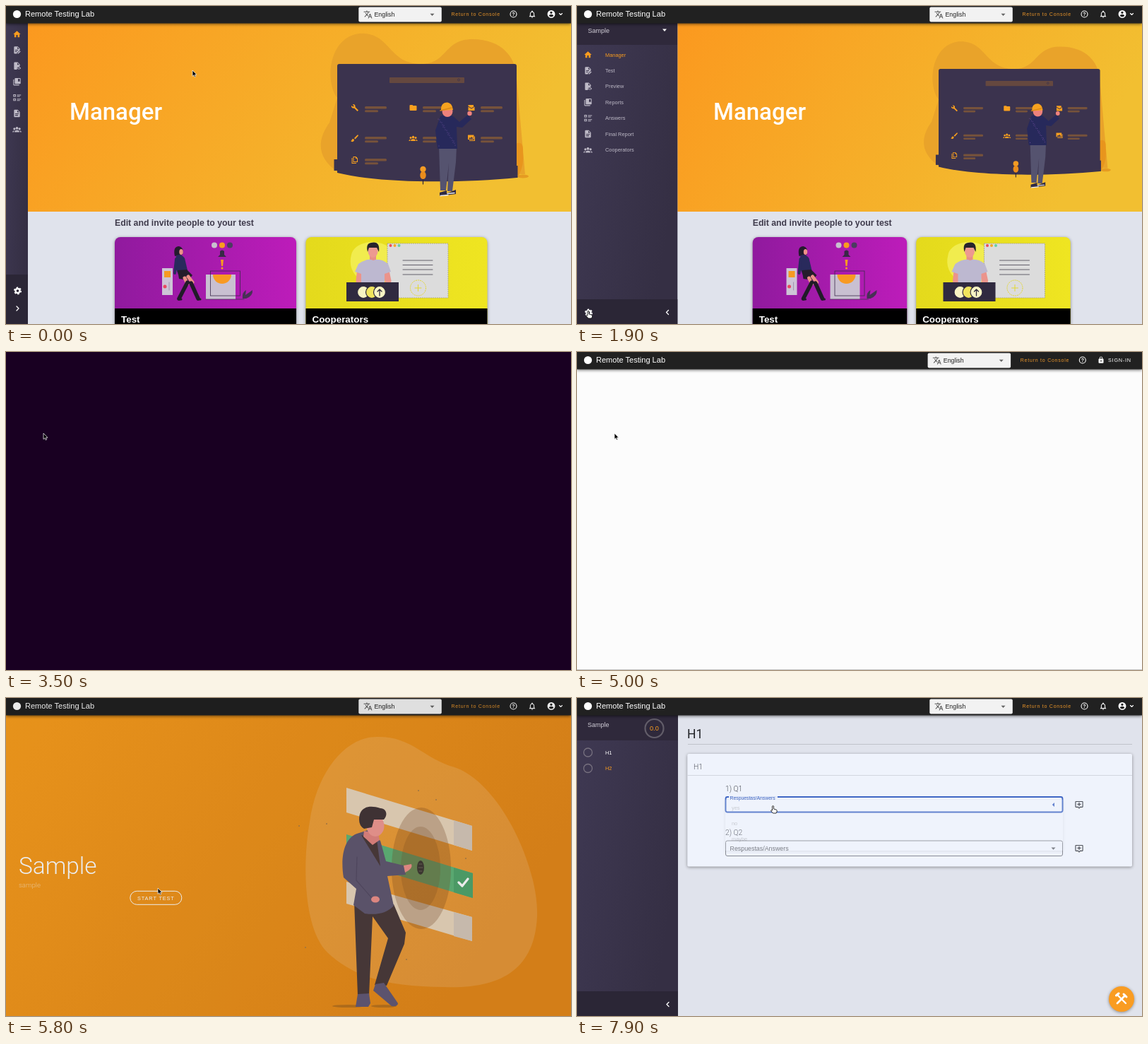
Animation of 800 by 450 pixels, one loop 8 s. Source, as an HTML page:

```html
<!DOCTYPE html>
<html lang="en">
<head>
<meta charset="utf-8">
<title>Remote Testing Lab</title>
<style>
html, body { margin: 0; width: 100%; height: 100%; overflow: hidden; background: #e0e3ec; }
svg { display: block; width: 800px; height: 450px; font-family: "Liberation Sans", Arial, sans-serif; }
.rb { font-family: Roboto, sans-serif; }
.card { filter: drop-shadow(0 1px 2px #0006); }
</style>
</head>
<body>
<svg id="stage" viewBox="0 0 800 450"></svg>
<script>
const svg = document.getElementById("stage");
const text = (x, y, size, fill, str, extra = "") =>
  `<text x="${x}" y="${y}" font-size="${size}" fill="${fill}" ${extra}>${str}</text>`;
const rect = (x, y, w, h, fill, extra = "") =>
  `<rect x="${x}" y="${y}" width="${w}" height="${h}" fill="${fill}" ${extra}/>`;
const circ = (x, y, r, fill, extra = "") => `<circle cx="${x}" cy="${y}" r="${r}" fill="${fill}" ${extra}/>`;
const oval = (x, y, rx, ry, fill, extra = "") =>
  `<ellipse cx="${x}" cy="${y}" rx="${rx}" ry="${ry}" fill="${fill}" ${extra}/>`;
const path = (d, fill, extra = "") => `<path d="${d}" fill="${fill}" ${extra}/>`;
const line = (d, color, w, extra = "") =>
  path(d, "none", `stroke="${color}" stroke-width="${w}" stroke-linecap="round" stroke-linejoin="round" ${extra}`);
const group = (id, inner, extra = "") => `<g id="${id}" ${extra}>${inner}</g>`;
// 24-unit icon centred on a point
const icon = (name, x, y, fill, size = 12) =>
  `<g transform="translate(${x - size / 2} ${y - size / 2}) scale(${size / 24})">${path(icons[name], fill, 'fill-rule="evenodd"')}</g>`;
const grad = (id, a, b, x2 = 1, y2 = 0) =>
  `<linearGradient id="${id}" x2="${x2}" y2="${y2}"><stop stop-color="${a}"/><stop offset="1" stop-color="${b}"/></linearGradient>`;

const sheet = "M6 2H14L20 8V12L12 20V22H6Q4 22 4 20V4Q4 2 6 2M13 3.5V9H18.5Z";
const icons = {
  home: "M10 20v-6h4v6h5v-8h3L12 3 2 12h3v8z",
  edit: sheet + "M7 11H15V13H7ZM7 15H12V17H7ZM14 20L20 14 22 16 16 22H14Z",
  eye: sheet + "M12 18Q17 11 23 18 17 25 12 18M17.5 16A2 2 0 1 0 17.6 16Z",
  books: "M4 6H2V20Q2 22 4 22H18V20H4ZM20 2H8Q6 2 6 4V16Q6 18 8 18H20Q22 18 22 16V4Q22 2 20 2M20 12L17.5 10.5 15 12V4H20Z",
  list: "M2 3H9V10H2ZM4 5V8H7V5ZM12 4H23V6H12ZM12 8H20V10H12ZM2 14H9V21H2ZM4 16V19H7V16ZM12 15H23V17H12ZM12 19H20V21H12Z",
  doc: "M13 9H18.5L13 3.5V9M6 2H14L20 8V20Q20 22 18 22H6Q4 22 4 20V4Q4 2 6 2M15 18V16H7V18ZM17 14V12H7V14Z",
  people: "M12 5.5A3.5 3.5 0 1 0 12.1 5.5ZM5 8A3 3 0 1 0 5.1 8ZM19 8A3 3 0 1 0 19.1 8ZM5.5 20V18C6 13.5 18 13.5 18.5 18V20ZM0 20V18.5Q1 16 4.5 15.6 3.5 17 3.5 20ZM24 20V18.5Q23 16 19.5 15.6 20.5 17 20.5 20Z",
  lang: "M12.9 15.1L10.3 12.6Q13 9.5 14.1 6H17V4H10V2H8V4H1V6H12.2Q11.3 9 9 11.3 7.5 9.7 6.7 8H4.7Q5.8 10.5 7.7 12.6L2.6 17.6 4 19 9 14 12.1 17.1ZM18.5 10H16.5L12 22H14L15.1 19H19.9L21 22H23ZM15.9 17L17.5 12.7 19.1 17Z",
  bell: "M12 22Q14 22 14 20H10Q10 22 12 22M18 16V11Q18 6 13.5 4.7V4A1.5 1.5 0 0 0 10.5 4V4.7Q6 6 6 11V16L4 18V19H20V18ZM16 17H8V11C8 5 16 5 16 11Z",
  user: "M12 2A10 10 0 1 0 12.1 2ZM12 5A3 3 0 1 1 11.9 5ZM12 19.2Q8 19 6 16C6 12 18 12 18 16Q16 19 12 19.2Z",
  lock: "M18 8H17V6A5 5 0 0 0 7 6V8H6Q4 8 4 10V20Q4 22 6 22H18Q20 22 20 20V10Q20 8 18 8M12 17A2 2 0 1 1 12.1 17ZM15 8H9V6A3 3 0 0 1 15 6Z",
  note: "M4 2H20Q22 2 22 4V16Q22 18 20 18H15L12 21.5 9 18H4Q2 18 2 16V4Q2 2 4 2M4 4V16H10L12 18.5 14 16H20V4ZM11 5.5H13V9H16.5V11H13V14.5H11V11H7.5V9H11Z",
  folder: "M10 4H4Q2 4 2 6V18Q2 20 4 20H20Q22 20 22 18V8Q22 6 20 6H12Z",
  wrench: "M22 19L13 10Q14 6 11.500 3.500 9 1.500 5.500 2.500L9.500 6.500 6.500 9.500 2.500 5.500Q1 9 3.500 11.500 6.500 14 10 13L19 22Z",
  brush: "M7 14Q3 14 3 18 2 20 0 20 3 23 6 22 10 21 10 17 9 14 7 14M21 3Q20 2 18 4L10 12 13 15 21 6Q23 4 21 3",
  mail: "M3 4H18V8L21 10V20H3ZM3 7L12 13 20 8V10L12 15 3 9Z",
  pics: "M2 3H19V16H2ZM4 14H17L13 8 10 12 8 10ZM20 7H22V20H6V18H20Z",
  copy: "M7 2H15L20 7V18H7ZM9 4V16H18V8H14V4ZM3 6H5V20H16V22H3Z"
};

const heroArt = () => {
  const cells = [["wrench", 0, 0], ["folder", 1, 0], ["mail", 2, 0], ["brush", 0, 1], ["people", 1, 1], ["pics", 2, 1], ["copy", 0, 2]];
  const rows = [144, 187, 218];
  return path("M469 130C452 110 455 45 500 39C545 36 540 82 588 82C625 82 620 47 660 47C705 47 719 75 722 92L735 238 470 235C440 215 440 190 458 165Z", "#e9a32a") +
    oval(732, 241, 8, 2.5, "#e59b22") + path("M722 238V195Q733 190 732 207 734 225 726 240Z", "#e8951d") +
    path("M469 85Q469 82 472 82H720Q723 82 723 85V243C640 251 530 251 469 236Z", "#3b334e") +
    rect(464.500, 217, 5, 16, "#3b334e") + rect(722, 226, 2.500, 17, "#3b334e") +
    rect(543, 101, 106, 8, "#65483f", 'rx="1"') + circ(641, 104.500, 1.500, "none", 'stroke="#3b334e" stroke-width=".8"') +
    cells.map(([name, c, r]) => icon(name, 494 + c * 82.5, rows[r], "#f9a01f") +
      rect(508 + c * 82, rows[r] - 2, 31, 3.500, "#76523b", 'rx="1.500"') +
      rect(508 + c * 82, rows[r] + 3.200, 19, 3, "#76523b", 'rx="1.500"')).join("") +
    line("M590.500 234V252", "#2c263b", 1.2) + circ(590.5, 231, 4.2, "#f39b23") + oval(590.5, 239.5, 4.2, 5.5, "#ea8d1c") +
    path("M613 198H638L637 221 632 262H625L627 222 623 261H615Z", "#55536f") +
    path("M614 264L624 261V265L637 260V266L614 269Z", "#302b45") + line("M615 268.500L626 267.500M625 265.500L635 264.500", "#eee", 1.3) +
    path("M615 156Q624 151 633 156L642 164 654 154 659 160 646 172 638 171 639 202H611L608 176Z", "#27295b") +
    circ(656.5, 152, 3.2, "#ef827f") + oval(625, 149, 7.5, 8, "#ed817c") +
    path("M616 146C616 134 630 134 632 143L633 147 616 148Z", "#f6a21f") + line("M615 148L631 144", "#d98718", 1.5) +
    Array.from({ length: 22 }, (_, i) => circ(612 + i * 7 % 25, 160 + i * 11 % 40, .6, "#6b4d9a")).join("");
};

const purpleArt = () =>
  rect(221, 371, 15, 38, "#cdc5d6") + rect(224, 375, 9, 9, "#f69a22") + circ(225, 397, 2.5, "#e94961") + line("M231 391V402", "#8f839f", .7) +
  circ(295, 338.5, 4, "#c8c1ce") + circ(306, 338.5, 4, "#f99c1f") + circ(317, 338.5, 4, "#4b3b60") +
  path("M303 352V347Q306 344 309 347V352L312 355H300Z", "#382946") + path("M304 359H308L307 368H305Z", "#f99c1f") + circ(306, 371, 1.5, "#f99c1f") +
  rect(283, 380, 42, 35, "#c9c0d1") + path("M293 380H319A13 13 0 0 1 293 380Z", "#f89a23") +
  rect(289.5, 375, 42, 35, "none", 'stroke="#3c2b4d" stroke-width=".8"') +
  line("M283 415H337", "#4a3058", .8) + path("M335 414Q334 405 340 402L339 409 349 402Q350 410 340 414Z", "#473155") +
  path("M239 354Q236 340 245 340 252 341 250 352Z", "#241b2d") + oval(248, 348, 2.7, 4, "#ed9189") +
  path("M241 353Q248 350 253 357L257 374 244 380 239 368Z", "#292a5c") + line("M241 358L239 378", "#292a5c", 4) +
  path("M243 374L256 373 264 381 258 388 245 386Z", "#251d2b") + line("M258 383L264 391M253 385L257 393", "#ed8f87", 5) +
  line("M262 392L272 414M257 391L245 414", "#211b28", 5.5) + line("M272 415H275M244 415H248", "#211b28", 3);

const yellowArt = () =>
  path("M489 352C492 335 522 328 540 340L560 390H505Q483 375 489 352Z", "#f1ec4e") +
  rect(540, 336, 86, 77, "#dcdcdc", 'stroke="#a4a089" stroke-width=".8" stroke-dasharray="2 1"') +
  ["#ed4b58", "#f5a627", "#67d1a1"].map((c, i) => circ(544.5 + i * 6, 339, 2, c)).join("") +
  [360, 366.5, 373, 380].map(y => line(`M562 ${y}H604`, "#63606b", 1)).join("") +
  circ(583.5, 399, 11, "none", 'stroke="#e3d832" stroke-width="1" stroke-dasharray="2 1"') + line("M579 399H588M583.500 394.500V403.500", "#e3d832", 1) +
  line("M502 370L500 389M537 370L541 389", "#eb948c", 9) + rect(515, 352, 9, 10, "#e78f87") +
  path("M499 365Q512 356 520 360 530 356 541 365L545 376 536 379V392H503V379L494 376Z", "#bdb8d0") +
  oval(519.5, 347, 7, 9, "#ed9990") + path("M512 348Q509 336 517 335 530 332 528 348L525 342H514Z", "#27232c") +
  rect(482, 391, 74, 27, "#302a40") + [506, 518, 529].map((x, i) => circ(x, 405, 8.5, i % 2 ? "#f0e45d" : "#f8f4c4", 'stroke="#302a40" stroke-width="1.200"')).join("") +
  line("M529 410V401M526 404L529 401 532 404", "#302a40", 1.3);

const card = (id, fill, title, art) => group(id,
  rect(0, 327, 257, 140, fill, 'class="w" rx="8"') + rect(0, 428, 257, 22, "#000", 'class="w"') +
  text(9, 448, 13.4, "#fff", title, 'font-weight="bold"'), 'class="card"') + group(id + "Art", art);

const menu = ["Manager", "Test", "Preview", "Reports", "Answers", "Final Report", "Cooperators"];
const menuIcons = ["home", "edit", "eye", "books", "list", "doc", "people"];
const dash = group("dash",
  rect(0, 0, 800, 450, "#e0e3ec") + rect(31, 24, 769, 267, "url(#hero)", 'id="heroBg"') + group("heroArt", heroArt()) +
  group("heroTitle", text(0, 161, 33, "#fff", "Manager", 'class="rb" font-weight="500"')) +
  group("subTitle", text(0, 311, 12.27, "#3f3b4c", "Edit and invite people to your test", 'font-weight="bold"')) +
  card("cardA", "url(#purple)", "Test", purpleArt()) + card("cardB", "url(#yellow)", "Cooperators", yellowArt()) +
  rect(0, 24, 31, 426, "url(#side)", 'id="side"') +
  group("sideTop", rect(0, 24, 142, 31, "#2f293b") + text(15.5, 37.5, 9, "#d0cdd6", "Sample") + path("M121 32.500H127L124 36Z", "#fff")) +
  group("rows", menu.map((m, i) => {
    const y = 40 + i * 22.4, c = i ? "#bdb9c6" : "#f99c1f";
    return icon(menuIcons[i], 15.5, y, c, 12.5) + `<g class="label">${text(40, y + 2.6, 7.4, c, m)}</g>`;
  }).join("")) +
  rect(0, 380, 31, 70, "#2b2636", 'id="foot"') +
  group("gear", circ(0, 0, 3, "none", 'stroke="#fff" stroke-width="2.400"') + circ(0, 0, 4.7, "none", 'stroke="#fff" stroke-width="1.600" stroke-dasharray="2.460 2.460"')) +
  group("chev", line("M-1.500 -3L1.500 0 -1.500 3", "#fff", 1.3)));

const intro = group("intro",
  rect(0, 0, 800, 450, "url(#amber)") +
  path("M430 175C440 105 480 55 525 55C575 54 590 85 635 98C700 120 755 240 752 310C748 385 700 412 620 409C555 408 500 402 455 360C420 325 420 230 430 175Z", "#fff", 'opacity=".13"') +
  path("M482 127L660 181V216L482 162ZM482 260L660 310V344L482 291Z", "#ead7bd") + path("M482 193L661 248V283L482 229Z", "#60b57a") +
  path("M634 173L660 181V216L634 208ZM634 303L660 310V344L634 337Z", "#d7c9bb") + path("M634 240L661 248V283L634 275Z", "#51a66e") +
  oval(588, 241, 42, 86, "#7a4a20", 'opacity=".28"') + oval(587, 241, 28, 59, "#7a4a20", 'opacity=".22"') +
  oval(587, 240, 5, 10, "#403b34") + line("M584 240H590M585 235H589M585 245H589", "#8c8173", .6) +
  line("M641 261L646 266 654 256", "#fff", 3.2) +
  [[454, 178], [584, 131], [609, 144], [651, 227], [424, 353], [567, 370], [415, 181]].map(([x, y]) => circ(x, y, 1, "#a87c48")).join("") +
  oval(485, 436, 23, 2, "#bc741d") + oval(535, 436, 18, 2, "#bc741d") +
  path("M493 288L549 292 566 332 564 348 539 407 522 406 541 340 519 309 514 421H498Z", "#4c3c3c") +
  path("M498 419L514 418 516 432 513 437H495Z", "#645a77") + path("M523 405L535 403 555 432Q555 437 546 436L520 414Z", "#645a77") +
  path("M500 191L512 187 530 202 538 231 563 237 566 250 540 252 549 294Q535 309 508 305L492 293 496 270 478 254C474 230 476 197 500 191Z", "#625972") +
  path("M503 194L525 200 530 238Z", "#4c3c3c") + line("M497 225L496 258 518 283", "#554c65", 1.2) +
  path("M563 237L574 235Q577 241 565 247Z", "#ef918b") + oval(523, 285, 6, 4.5, "#ef918b") +
  path("M507 188L527 192 529 201 519 208 506 196Z", "#e48782") + oval(523, 181, 12.5, 15, "#f29a93") +
  path("M500 172C500 154 514 151 530 156 539 156 541 166 535 172L521 172 518 183 507 185Q500 181 500 172Z", "#443638") +
  text(18, 249, 33.4, "#fff", "Sample", 'class="rb" font-weight="300"') +
  text(18, 268, 9.6, "#fff", "sample", 'class="rb" font-weight="300" opacity=".55"') +
  rect(175.8, 273.3, 73, 19, "none", 'rx="9.500" stroke="#fff"') + text(186, 285.6, 7.3, "#fff", "START TEST", 'letter-spacing=".9"'));

const field = (y, n) =>
  text(210, y - 19, 10.3, "#4f525b", `${n}) Q${n}`, 'class="rb" font-weight="300"') +
  rect(210.5, y - 11, 477, 21.5, "none", `id="box${n}" rx="2.500" stroke="#888b93"`) +
  (n === 1 ? rect(215, y - 13, 69, 4, "#eff3fc", 'id="notch"') : "") +
  group("label" + n, text(0, 0, 8.85, "inherit", "Respuestas/Answers"), `fill="#5d6068" transform="translate(216.500 ${y + 3.2})"`) +
  group("arrow" + n, path("M-3 -1.500H3L0 1.700Z", "inherit"), `fill="#63666e" transform="translate(674.500 ${y})"`) +
  icon("note", 711, y + .5, "#4d5058", 13.5);
const test = group("test",
  rect(0, 0, 800, 450, "#e0e3ec") + rect(0, 24, 143, 426, "url(#side)") + rect(0, 24, 143, 36, "#2f293b") + rect(0, 415, 143, 35, "#2b2636") +
  text(15, 41, 9, "#d0cdd6", "Sample") + circ(109.5, 43, 13, "none", 'stroke="#625d69" stroke-width="2.200"') + text(103, 46.3, 9.2, "#f99c1f", "0.0") +
  [["H1", 77, "#fff"], ["H2", 99.5, "#f99c1f"]].map(([s, y, c]) => circ(15.5, y, 6, "none", 'stroke="#77717f" stroke-width="1.300"') + text(40, y + 2.6, 7.4, c, s)).join("") +
  line("M130 430.500L127 433.500 130 436.500", "#fff", 1.3) +
  text(156, 57, 17.5, "#202226", "H1", 'class="rb"') + rect(157, 65, 629, 1, "#bfc2ca") +
  rect(156.3, 79, 629.7, 159.5, "#eff3fc", 'rx="2" class="card"') + rect(156.3, 109, 629.7, 1, "#d2d6df") +
  text(165, 100.5, 10.3, "#53565e", "H1", 'class="rb" font-weight="300"') +
  field(151, 1) + field(213, 2) +
  group("menu", rect(210, 144, 478, 72, "#eff3fc", 'class="card"') + ["yes", "no", "maybe"].map((s, i) => text(219, 157.5 + i * 22.4, 7.4, "#333", s)).join("")) +
  circ(771, 426, 18, "#f99c22", 'class="card"') +
  line("M765 420L777 432", "#fff", 2.4) + line("M765 432L776 421", "#fff", 2.8) + line("M763.500 421L767 418", "#fff", 3) +
  line("M774 419L778 423", "#fff", 3));

const header =
  rect(0, 0, 800, 24.5, "#212121", 'style="filter:drop-shadow(0 1px 2px #0009)"') + circ(15.5, 11.5, 5.6, "#fff") +
  text(27, 15.2, 11.05, "#fff", "Remote Testing Lab") +
  group("tools", rect(499.3, 1.5, 117.5, 21, "#f2f2f2", 'rx="2"') + icon("lang", 512.5, 12, "#555", 13) + text(521.5, 15.3, 8.8, "#222", "English") +
    path("M600.500 10.800H606.500L603.500 14Z", "#666") + text(630.5, 13.9, 7, "#e8942a", "Return to Console", 'letter-spacing=".760"') +
    circ(718.5, 11.5, 4.5, "none", 'stroke="#fff" stroke-width="1.100"') + text(718.5, 14.1, 7, "#fff", "?", 'text-anchor="middle" font-weight="bold"')) +
  group("userTools", icon("bell", 745, 11.5, "#fff", 12.5) + icon("user", 772, 11.5, "#fff", 13) + line("M783.500 10.500L785.500 12.500 787.500 10.500", "#fff", 1.1)) +
  group("signIn", icon("lock", 742, 11.3, "#fff", 10.5) + text(752, 14, 7.3, "#fff", "SIGN-IN", 'letter-spacing=".75"'));

svg.innerHTML = "<defs>" + grad("hero", "#fb991f", "#f2bf31", 1, .25) + grad("amber", "#fb9f1d", "#e5891a", 1, .4) +
  grad("side", "#3f3953", "#352f44", 1, .5) + grad("purple", "#901a9e", "#bd1cba") + grad("yellow", "#e4da1c", "#efe521") + "</defs>" +
  dash + group("blank", rect(0, 0, 800, 450, "#fcfcfc") + rect(0, 449, 800, 1, "#c4c4c4")) + intro + test + header +
  rect(0, 0, 800, 450, "#000", 'id="dim"') + rect(0, 0, 800, 450, "#190022", 'id="dark"') +
  group("pointer", path("M0 0V8.400L1.900 6.700 3.200 9.500 4.600 8.900 3.400 6.200H6Z", "#000", 'stroke="#fff" stroke-width=".700"')) +
  group("hand", path("M-1 0Q0-1 1 0V4L5 5.200Q6 6 5.500 8L4.500 10H0L-3 6.500Q-3 5-1 6Z", "#fff", 'stroke="#000" stroke-width=".800"'));

const el = Object.fromEntries([...svg.querySelectorAll("[id]")].map(n => [n.id, n]));
const set = (id, attrs) => { for (const k in attrs) el[id].setAttribute(k, attrs[k]); };
const move = (id, x, y, more = "") => set(id, { transform: `translate(${x} ${y}) ${more}` });
const fade = (id, opacity) => set(id, { opacity });
const lin = (t, a, b) => Math.min(1, Math.max(0, (t - a) / (b - a)));
const ease = (t, a, b) => { const p = lin(t, a, b); return p * p * (3 - 2 * p); };
const mix = (a, b, p) => a + (b - a) * p;

// time, x, y
const track = [[0, 264, 91], [100, 264, 91], [800, 17, 425], [1300, 17, 425], [1700, 16, 432], [1900, 16, 432], [2600, 53, 115],
  [5100, 53, 115], [5800, 215, 269], [6100, 217, 285], [6900, 217, 285], [7600, 277.5, 153], [8000, 277.5, 153]];
const within = (t, spans) => spans.some(([a, b]) => t >= a && t < b);

function sidebar(p) {
  const s = mix(31, 142.3, p), w = mix(257, 218.5, p), k = mix(1, .9, p);
  const xa = mix(154, 248.7, p), xb = mix(424.5, 480.2, p);
  set("heroBg", { x: s, width: 800 - s });
  move("heroArt", mix(0, 512 - 469 * .9, p), mix(0, 89 - 82 * .9, p), `scale(${k})`);
  move("heroTitle", mix(90, 193, p), 0);
  move("subTitle", mix(154, 248.7, p), 0);
  move("cardA", xa, 0);
  move("cardB", xb, 0);
  move("cardAArt", mix(0, 75.5, p), 0);
  move("cardBArt", mix(0, 36.5, p), 0);
  svg.querySelectorAll(".w").forEach(n => n.setAttribute("width", w));
  set("side", { width: s });
  fade("sideTop", p);
  move("rows", 0, 29 * p);
  svg.querySelectorAll(".label").forEach(n => n.setAttribute("opacity", p));
  set("foot", { width: s, y: mix(380, 415, p) });
  move("gear", 16.5, mix(403, 434, p));
  move("chev", mix(16.5, 128, p), mix(428, 433.5, p), `rotate(${180 * p})`);
}

function draw(t) {
  sidebar(ease(t, 1000, 1300));
  const loaded = ease(t, 5000, 5300), away = t >= 3400;
  fade("dash", away ? 0 : 1);
  fade("blank", away ? 1 : 0);
  fade("intro", loaded);
  fade("test", ease(t, 6100, 6400));
  fade("dark", lin(t, 2700, 3100) * (1 - lin(t, 3700, 4100)));
  fade("dim", .08 * loaded * (1 - lin(t, 5800, 6000)));

  const guest = away && t < 5200;
  move("tools", guest ? -2.7 : 0, 0);
  fade("userTools", guest ? 0 : 1);
  fade("signIn", guest ? 1 : 0);

  const f = lin(t, 7700, 7920), blue = "#3f66c4";
  set("box1", { stroke: f ? blue : "#888b93", "stroke-width": f ? 1.8 : 1 });
  fade("notch", f);
  move("label1", 216.5, mix(154.2, 143.4, f), `scale(${mix(1, .75, f)})`);
  set("label1", { fill: f ? blue : "#5d6068" });
  move("arrow1", 674.5, 151, `rotate(${Math.max(0, t - 7800) * .9})`);
  set("arrow1", { fill: f ? blue : "#63666e" });
  fade("menu", lin(t, 7800, 8300));

  const i = track.findIndex(([end]) => end > t), [ta, ax, ay] = track[i - 1], [tb, bx, by] = track[i];
  const q = ease(t, ta, tb), x = mix(ax, bx, q), y = mix(ay, by, q);
  const hand = within(t, [[800, 2000], [2500, 2800], [5900, 6300], [7500, 8000]]);
  move("pointer", x, y);
  move("hand", x, y);
  fade("pointer", hand ? 0 : 1);
  fade("hand", hand ? 1 : 0);
}

const start = performance.now();
function tick() {
  draw(Math.floor((performance.now() - start) % 8000 / 100) * 100);
  requestAnimationFrame(tick);
}
tick();
</script>
</body>
</html>
```
